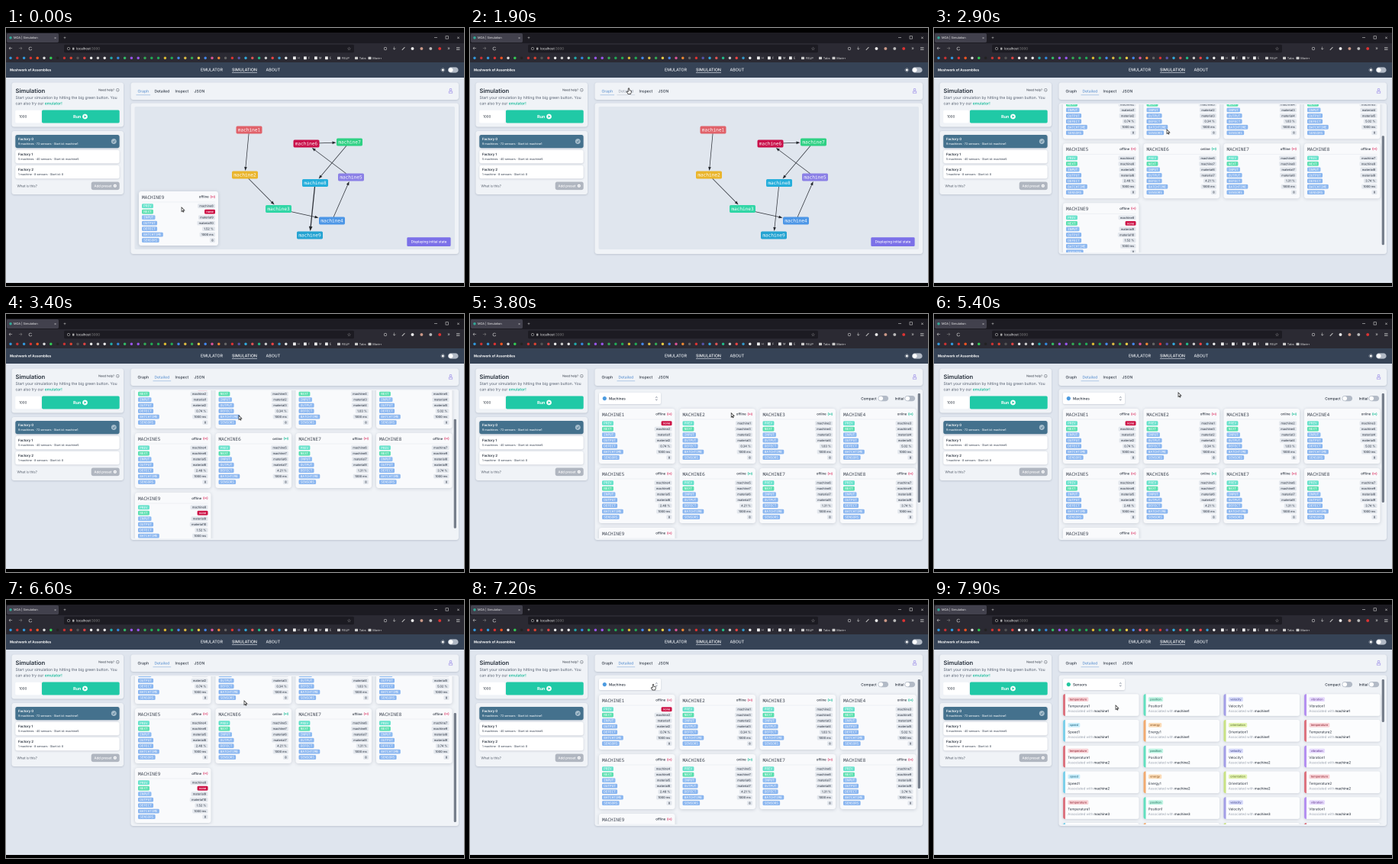
Recreate the animation shown at these times as an HTML page with a canvas. Size 600 px wide and 338 px high, loop 8000 ms.

```html
<!DOCTYPE html>
<html lang="en">
<head>
<meta charset="utf-8">
<title>Simulation</title>
<style>
html, body { margin: 0; width: 100%; height: 100%; overflow: hidden; background: #000; }
canvas { display: block; width: 600px; height: 338px; }
</style>
</head>
<body>
<canvas id="stage"></canvas>
<script>
const LOOP = 8000;
const canvas = document.getElementById('stage');
const c = canvas.getContext('2d');
// Oversampled so that the tiny text keeps its true widths
const scale = 2 * (window.devicePixelRatio || 1);
canvas.width = 600 * scale;
canvas.height = 338 * scale;
c.textRendering = 'geometricPrecision';

const SANS = 'Inter, sans-serif', MONO = '"Noto Sans Mono", monospace';
const INK = '#2c3440', PANEL = '#f0f3f7', PAGE = '#dfe5ee';
const COLUMNS = [169, 274.5, 379.5, 485], CARD_W = 99.5;

const nodes = [
  [318.5, 133.5, '#e0626a'], [313, 192.5, '#eab52c'], [357, 237, '#31d6a6'],
  [427, 252.5, '#4c96e6'], [452, 195.5, '#8b80e6'], [393.5, 151.5, '#c9104a'],
  [450, 149.5, '#2fd184'], [405, 203, '#25aedb'], [398, 271.5, '#24a3d2']
];
const defects = ['0.74', '0.34', '1.03', '5.02', '2.48', '4.21', '1.31', '3.74', '1.52'];
const online = [3, 4, 6];
// name, stripe, badge, badge text
const sensors = [
  ['temperature', '#dc7480', '#f8d2d6', '#9c3644'], ['position', '#62dfbf', '#bdf3e2', '#2c7a66'],
  ['velocity', '#a39ee6', '#d6d9fa', '#4a4f94'], ['vibration', '#b490f0', '#e6dafc', '#70489c'],
  ['speed', '#7dd0ea', '#c8edfa', '#2f7590'], ['energy', '#f1aa70', '#fbdcb8', '#96602a'],
  ['orientation', '#c8e284', '#e3f3b0', '#6c8236'], ['temperature', '#dc7480', '#f8d2d6', '#9c3644']
];
const bookmarks = ('#39d #c33 #39d #d33 #f52 #ddd #3c5 #222 #c33 #d43 #555 #d44 #eee #ccc #eee #2aa #38d ' +
  '#3b6 #95e #95e #3a5 #2a5 #2a5 #db3 #2a5 #48e #db4 #3a5 #ec4 #48e #d59 #e83 #666 #d33 #55a #3ad ' +
  '#d55 #2b8 #ccc #e44 #39c #eee').split(' ');

// [time, ...values], eased between neighbours
const cursorPath = [
  [0, 230, 235], [500, 227, 228], [1000, 224, 195], [1700, 208, 79], [2200, 208, 79],
  [2800, 305, 133], [3600, 305, 133], [4400, 541, 112], [4950, 541, 112],
  [5350, 320, 103], [5700, 320, 103], [6200, 312, 132], [6750, 312, 132],
  [7250, 238, 110], [7400, 238, 110], [7650, 238, 138]
];
const scrollPath = [
  [0, 0], [2600, 0], [3000, 60], [3310, 60], [3600, 0], [5500, 0], [6100, 60], [6600, 60], [6800, 0]
];

function at(path, t) {
  const i = path.findIndex(key => key[0] > t);
  if (i < 0) return path[path.length - 1].slice(1);
  const [a, b] = [path[i - 1], path[i]];
  const p = (t - a[0]) / (b[0] - a[0]), e = p * p * (3 - 2 * p);
  return a.slice(1).map((v, k) => v + (b[k + 1] - v) * e);
}
const clamp = v => Math.max(0, Math.min(1, v));

function box(x, y, w, h, r, fill, shadow) {
  c.save();
  if (shadow) {
    c.shadowColor = 'rgba(40,55,80,.2)';
    c.shadowBlur = shadow * scale;
    c.shadowOffsetY = .7 * scale;
  }
  c.fillStyle = fill;
  c.beginPath();
  c.roundRect(x, y, w, h, r);
  c.fill();
  c.restore();
}
function disc(x, y, r, fill) {
  c.fillStyle = fill;
  c.beginPath();
  c.arc(x, y, r, 0, 7);
  c.fill();
}
function ring(x, y, r, color, from = 0, to = 7, width = .6) {
  c.strokeStyle = color;
  c.lineWidth = width;
  c.beginPath();
  c.arc(x, y, r, from, to);
  c.stroke();
}
function line(color, width, ...points) {
  c.strokeStyle = color;
  c.lineWidth = width;
  c.beginPath();
  for (let i = 0; i < points.length; i += 2) c.lineTo(points[i], points[i + 1]);
  c.stroke();
}
function shape(fill, ...points) {
  c.fillStyle = fill;
  c.beginPath();
  for (let i = 0; i < points.length; i += 2) c.lineTo(points[i], points[i + 1]);
  c.closePath();
  c.fill();
}
// y is the middle of the capitals
function text(s, x, y, size, color, weight = 400, align = 'left', family = SANS) {
  c.font = `${weight} ${size}px ${family}`;
  c.textAlign = align;
  c.fillStyle = color;
  c.fillText(s, x, y + size * .36);
  return c.measureText(s).width;
}
function tag(s, x, y, fill, color, right, family = SANS, size = 3.9) {
  c.font = `500 ${size}px ${family}`;
  const w = c.measureText(s).width + 4.6;
  if (right) x -= w;
  box(x, y - 2.9, w, 5.8, 1.5, fill);
  text(s, x + 2.3, y, size, color, 500, 'left', family);
}
function toggle(x, y, on = 0) {
  box(x, y - 3.6, 13.6, 7.2, 3.6, on > .5 ? '#6b7688' : '#b2bac6');
  disc(x + 3.7 + 6.2 * on, y, 2.9, '#fff');
}

function browser() {
  box(0, 6, 600, 14, 0, '#1c1b22');
  box(1, 7, 68, 12, 2, '#42414d');
  disc(6, 12.8, 1.7, '#3a9');
  text('MOA | Simulation', 10, 12.8, 3.9, '#eee');
  text('×', 64.5, 12.5, 5, '#ccc', 400, 'center');
  text('+', 77, 12.5, 6, '#ccc', 400, 'center');
  line('#ccc', .6, 561, 12.5, 565, 12.5);
  c.strokeRect(576, 10.7, 3.4, 3.4);
  text('×', 592.5, 12.5, 6, '#ccc', 400, 'center');

  box(0, 20, 600, 25, 0, '#2b2a33');
  text('←', 6, 26.5, 6, '#ddd', 400, 'center');
  text('→', 19, 26.5, 6, '#888', 400, 'center');
  ring(32, 27, 2, '#ddd', .4, 5.6);
  box(76, 21.7, 380, 10.6, 2, '#1c1b22');
  ring(82, 27, 1.6, '#aaa');
  box(87, 25.6, 2.4, 3, .5, '#aaa');
  const w = text('localhost', 92, 27, 4.4, '#eee');
  text(':3000', 92 + w, 27, 4.4, '#888');
  text('☆', 449.5, 27, 6, '#ccc', 400, 'center', '"DejaVu Sans", sans-serif');
  ring(497, 27, 1.8, '#ccc');
  text('↓', 508.7, 26.7, 5.5, '#ccc', 500, 'center');
  line('#ccc', 1, 518.8, 28.8, 522.4, 25.2);
  ['#eee', '#c98', '#bbb', '#d33'].forEach((color, i) => disc(532.5 + i * 11.9, 27, 1.9, color));
  text('»', 580, 26.5, 6, '#ccc', 400, 'center');
  for (const dy of [-1.7, 0, 1.7]) line('#ccc', .6, 590, 27 + dy, 594.5, 27 + dy);

  bookmarks.forEach((color, i) => disc(6 + i * 8.8, 39.3, 1.7, color));
  ['H', 'F', 'M', 'E'].forEach((s, i) => {
    box(376 + i * 14, 37.4, 3.8, 3.8, .5, '#eee');
    text(s, 382 + i * 14, 39.4, 3.7, '#ddd');
  });
  [['FEUP', 434], ['Tabs', 457], ['More+', 474.5]].forEach(([s, x]) => {
    box(x, 37.8, 4, 3.3, .5, '#ccc');
    text(s, x + 5.8, 39.4, 3.9, '#ddd');
  });
}

function header() {
  box(0, 45, 600, 20, 0, '#364356');
  text('Meshwork of Assemblies', 5, 55, 4.4, '#fff', 700);
  text('EMULATOR', 255, 54.8, 5.3, '#eef1f5', 500);
  text('SIMULATION', 296, 54.8, 5.3, '#fff', 500);
  line('#dfe5ee', .6, 296, 58.6, 329, 58.6);
  text('ABOUT', 340.5, 54.8, 5.3, '#eef1f5', 500);
  disc(572.3, 55, 1.5, '#fff');
  for (let a = 0; a < 6.2; a += Math.PI / 4) {
    const [x, y] = [Math.cos(a), Math.sin(a)];
    line('#fff', .5, 572.3 + 2 * x, 55 + 2 * y, 572.3 + 3 * x, 55 + 3 * y);
  }
  toggle(579, 55);
}

function sidebar() {
  box(7.5, 71.5, 146.5, 58, 3, PANEL, 2);
  text('Simulation', 12.5, 82.5, 7.6, '#27303c', 600);
  text('Need help?', 142, 81.3, 3.9, INK, 400, 'right');
  ring(146.3, 81.3, 1.9, INK, 0, 7, .4);
  text('i', 146.3, 81.3, 2.8, INK, 500, 'center');
  text('Start your simulation by hitting the big green button. You', 12.5, 91, 5, '#596373');
  const w = text('can also try our ', 12.5, 98.5, 5, '#596373');
  text('emulator!', 12.5 + w, 98.5, 5, '#1fbd9d', 600);
  box(12.2, 107.8, 33.5, 16.6, 2, '#fff');
  text('1000', 17, 116, 4.5, INK);
  box(47, 107.5, 101.7, 17, 2, '#20c9a6');
  text('Run', 88, 116, 5.4, '#fff', 700);
  disc(103.5, 116, 3.4, '#fff');
  shape('#20c9a6', 102.5, 114.3, 102.5, 117.7, 105.4, 116);

  box(7.5, 135, 146.5, 83, 3, PANEL, 2);
  ['9 machines · 72 sensors · Start id: machine1', '5 machines · 40 sensors · Start id: machine5',
    '1 machine · 8 sensors · Start id: 0'].forEach((info, i) => {
    const y = 140 + i * 20;
    box(12.3, y, 136.3, 17.2, 2.5, i ? '#fff' : '#44718d', 2.5);
    text('Factory ' + i, 16, y + 5.4, 4.4, i ? INK : '#fff', 600);
    text(info, 16, y + 11.8, 3.75, i ? '#4f5866' : '#f0f5f8', 500);
  });
  disc(141.3, 148.5, 3.5, '#a4bccb');
  line('#44718d', .7, 139.8, 148.6, 140.9, 149.8, 143, 147.3);
  text('What is this?', 14.5, 207, 4.4, '#4f5866');
  box(111.7, 201.5, 37, 10.6, 2.5, '#b0b6c0');
  text('Add preset', 115.5, 206.8, 4.4, '#fff', 500);
  disc(142.8, 206.8, 2, '#fff');
  text('+', 142.8, 206.7, 4, '#b0b6c0', 700, 'center');
}

function tabs(active, hover) {
  box(163.5, 71.5, 429.5, 22.5, 3, PANEL, 2);
  [['Graph', 172.5], ['Detailed', 194.5], ['Inspect', 221.5], ['JSON', 246.5]].forEach(([s, x], i) => {
    const on = i === active, over = i === hover;
    const w = text(s, x, 82.5, 5, on ? '#6a9bd4' : over ? '#a3abb8' : '#333c49', 500);
    if (on || over) line(on ? '#8bb0dc' : '#c3cad5', .7, x - 2, 87.8, x + w + 2, 87.8);
  });
  ring(582.5, 80.8, 1.4, '#9a8ce8');
  c.strokeRect(580.2, 83, 4.6, 2.2);
}

function edge(from, to, bold) {
  const dx = to[0] - from[0], dy = to[1] - from[1], length = Math.hypot(dx, dy);
  const s = Math.min(17.5 / Math.abs(dx), 5.5 / Math.abs(dy));
  const x = to[0] - dx * s, y = to[1] - dy * s;
  const ux = dx / length, uy = dy / length, size = bold ? 6 : 5, half = bold ? 2.3 : 1.8;
  const bx = x - ux * size, by = y - uy * size;
  line('#30343b', bold ? 1.3 : .75, from[0], from[1], bx, by);
  shape('#22262c', x, y, bx - uy * half, by + ux * half, bx + uy * half, by - ux * half);
}

function graph(bold, popup) {
  box(168.5, 103, 419.5, 187, 2, '#e0e6ee');
  for (let i = 0; i < 8; i++) edge(nodes[i], nodes[i + 1], bold && i === 7);
  nodes.forEach(([x, y, color], i) => {
    box(x - 17, y - 5, 34, 10, 2, color);
    text('machine' + (i + 1), x, y, 6.1, '#fff', 500, 'center', MONO);
  });
  box(525.3, 274.2, 57.3, 11.8, 1.5, '#7b70e8');
  text('Displaying initial state', 554, 280, 4.5, '#fff', 500, 'center');
  if (popup) machineCard(9, 174, 214, 104, 71, false);
}

function machineCard(n, x, y, w, h, detailed) {
  const right = x + w, live = online.includes(n), signal = live ? '#22bf9b' : '#e0507a';
  box(x, y, w, h, 3, '#f9fafc', 4);
  text('MACHINE' + n, x + 4, y + 7.7, 6.1, '#3a414e', 400, 'left', MONO);
  text(live ? 'online' : 'offline', right - 12.3, y + 7.2, 4.3, INK, 500, 'right');
  disc(right - 7.2, y + 7.2, .7, signal);
  for (const r of [1.6, 2.8]) {
    ring(right - 7.2, y + 7.2, r, signal, -.8, .8, .55);
    ring(right - 7.2, y + 7.2, r, signal, 2.34, 3.94, .55);
  }
  line('#e3e7ed', .5, x + 4, y + 14, right - 4, y + 14);
  const rows = [
    ['PREV', n > 1 ? 'machine' + (n - 1) : 'none', '#66e2cb'],
    ['NEXT', n < 9 ? 'machine' + (n + 1) : 'none', '#5ce0b0'],
    ['INPUT', 'material' + n, '#8fbcf2'], ['OUTPUT', 'material' + (n + 1), '#8ab6f0'],
    ['DEFECT', defects[n - 1] + ' %', '#8ab6f0'], ['BATCHTIME', '1000 ms', '#8ab6f0'],
    ['SENSORS', '8', '#8ab6f0']
  ];
  rows.forEach(([label, value, color], i) => {
    const cy = y + 19.2 + i * 7.48, none = value === 'none';
    tag(label, x + 4, cy, color, '#fff', false, MONO, 4.3);
    tag(value, right - 4, cy, none ? '#cd1246' : '#e3e7ed', none ? '#fff' : '#3d4552', true);
  });
  if (!detailed) return;
  sensors.forEach(([name], i) => {
    const cy = y + 71.4 + i * 6.58;
    tag('SENSOR', x + 4, cy, '#8996ab', '#fff', false, MONO, 4.3);
    text(name, x + 27.5, cy, 4, INK);
    box(right - 19, cy - 2.7, 5.6, 5.4, 1.2, '#a78bea');
    text('id', right - 16.2, cy, 3.4, '#fff', 500, 'center');
    tag(name[0] + (i === 7 ? 2 : 1), right - 4, cy, '#e3e7ed', '#3d4552', true);
  });
}

function sensorCard(i, x, y) {
  const [name, color, pale, deep] = sensors[i % 8];
  box(x, y, CARD_W, 28.6, 2.5, '#fcfdfe', 3);
  box(x, y, 3, 28.6, [2.5, 0, 0, 2.5], color);
  tag(name, x + 6.5, y + 6.8, pale, deep, false, SANS, 3.8);
  text(name[0].toUpperCase() + name.slice(1) + (i % 8 === 7 ? 2 : 1), x + 6.3, y + 15.7, 4.5, INK);
  const w = text('Associated with ', x + 6.3, y + 22.2, 4.4, '#9aa2af');
  text('machine' + (1 + (i >> 3)), x + 6.3 + w, y + 22.2, 4.4, INK, 500);
}

function details(scroll, detailed, knob, showSensors, menu) {
  c.save();
  c.beginPath();
  c.rect(164, 100, 428, 194);
  c.clip();
  c.translate(0, -scroll);
  box(169, 103, 81, 15, 2, '#fff', 2);
  disc(176.3, 110.6, 2.6, showSensors ? '#22c7a0' : '#4c9be0');
  text(showSensors ? 'Sensors' : 'Machines', 182, 110.6, 4.7, INK, 500);
  line('#7b8594', .6, 243, 109.8, 244.3, 108.4, 245.6, 109.8);
  line('#7b8594', .6, 243, 111.6, 244.3, 113, 245.6, 111.6);
  text(detailed ? 'Detailed' : 'Compact', 532.6, 110.6, 4.7, INK, 500, 'right');
  toggle(534.5, 110.6, knob);
  text('Initial', 568.5, 110.6, 4.7, INK, 500, 'right');
  toggle(569.5, 110.6);

  if (showSensors) {
    for (let i = 0; i < 24; i++) sensorCard(i, COLUMNS[i % 4], 123.3 + (i >> 2) * 33.75);
  } else {
    const [pitch, h] = detailed ? [131, 125] : [78, 72];
    for (let i = 0; i < 9; i++)
      machineCard(i + 1, COLUMNS[i % 4], 124 + (i >> 2) * pitch, CARD_W, h, detailed);
  }
  if (menu) {
    box(169, 120, 81, 28, 2, '#fff', 5);
    box(169, 134.5, 81, 12, 0, '#e8eef6');
    [['Machines', '#4c9be0', 127.5], ['Sensors', '#22c7a0', 140.5]].forEach(([s, color, y]) => {
      disc(176.3, y, 2.6, color);
      text(s, 182, y, 4.7, INK, 500);
    });
  }
  c.restore();
  const length = showSensors ? 56 : detailed ? 86 : 143;
  box(586.7, 104 + scroll * 44 / 60, 3.2, length, 1.2, '#747c89');
}

function cursor(x, y, hand) {
  c.save();
  c.translate(x, y);
  c.beginPath();
  if (hand) {
    c.moveTo(-.8, 4.5); c.lineTo(-.8, .4); c.quadraticCurveTo(0, -.6, .8, .4);
    c.lineTo(.8, 2.6); c.lineTo(3.2, 3.2); c.lineTo(3.2, 5.6); c.lineTo(2.4, 7.4);
    c.lineTo(-1, 7.4); c.lineTo(-2.7, 4.6); c.lineTo(-2, 3.9);
  } else {
    for (const [px, py] of [[0, 0], [0, 5.5], [1.3, 4.4], [2.1, 6.2], [3, 5.8], [2.2, 4], [3.9, 3.9]])
      c.lineTo(px, py);
  }
  c.closePath();
  c.fillStyle = '#fff';
  c.strokeStyle = '#222';
  c.lineWidth = .7;
  c.fill();
  c.stroke();
  c.restore();
}

function draw(t) {
  c.setTransform(scale, 0, 0, scale, 0, 0);
  box(0, 0, 600, 338, 0, '#000');
  box(0, 65, 600, 269, 0, PAGE);
  browser();
  header();
  sidebar();

  const inGraph = t < 2100;
  const [x, y] = at(cursorPath, t);
  const overTab = t >= 1600 && t < 2300;
  tabs(inGraph ? 0 : 1, inGraph && overTab ? 1 : -1);
  box(163.5, 98.5, 429.5, 197.5, 3, PANEL, 2);
  if (inGraph) {
    graph(t < 1000, t < 600);
  } else {
    const knob = clamp((t - 4600) / 200) - clamp((t - 5000) / 200);
    details(at(scrollPath, t)[0], t >= 4600 && t < 5000, knob, t >= 7800, t >= 7350 && t < 7800);
  }
  const overToggle = t >= 4350 && t < 5050;
  cursor(x, y, overTab || overToggle || (t >= 7200 && t < 7800));
}

function tick() {
  draw(performance.now() % LOOP);
  requestAnimationFrame(tick);
}
tick();
</script>
</body>
</html>
```
